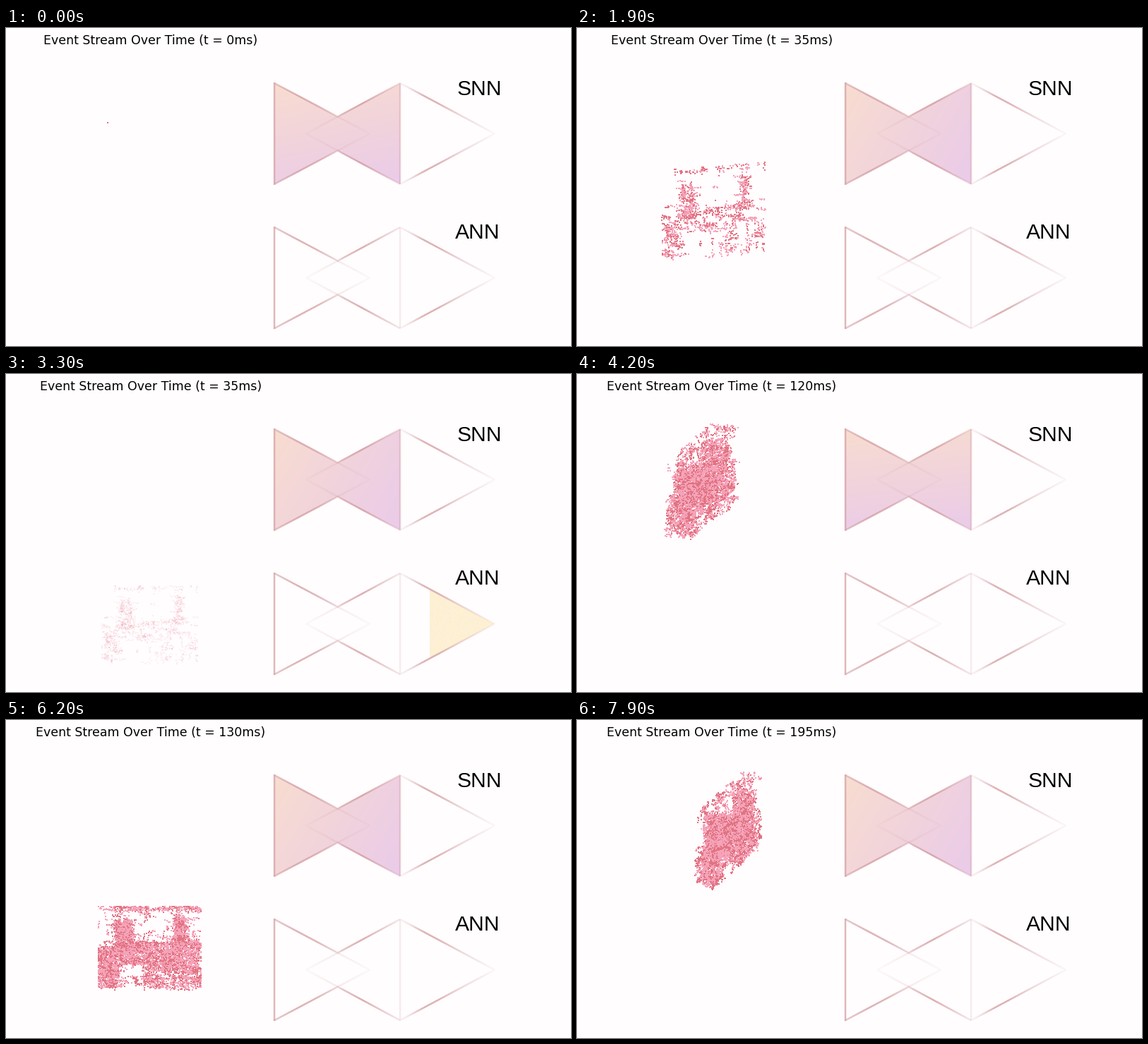
Write a matplotlib script that moves like this. It is 800 by 450 pixels and loops after 8 s.

```python
import numpy as np
import matplotlib.pyplot as plt
from matplotlib.animation import FuncAnimation
from matplotlib.collections import LineCollection
from matplotlib.colors import to_rgb
from matplotlib.patches import Polygon

W, H, DPI = 800, 450, 100
STEP, LOOP, PERIOD = 100, 8000, 4000
BG = "#fffdfe"
PX = 72 / DPI  # points per pixel

fig = plt.figure(figsize=(W / DPI, H / DPI), dpi=DPI, facecolor=BG)
ax = fig.add_axes([0, 0, 1, 1])
ax.set_axis_off()

LEFT, MID, RIGHT = 380, 558, 692
TALL = 143
EDGE = "#d0989c"


def rgb(*names):
    return np.array([to_rgb(n) for n in names])


WARM = rgb("#f8ddd0", "#f1d3dc", "#eacbea")
PINK = rgb("#f9dfe3", "#f9dbe2", "#f8dce4")
YELLOW = rgb("#fff3cd", "#fcefdc", "#f9e6e2")


def shade(s, stops):
    s = np.clip(s, 0, 1)
    x = np.linspace(0, 1, len(stops))
    return np.stack([np.interp(s, x, stops[:, i]) for i in range(3)], -1)


def smooth(p):
    p = np.clip(p, 0, 1)
    return p * p * (3 - 2 * p)


def edge(p, q, stops):
    """Line whose opacity varies along its length."""
    pos, alpha = zip(*stops)
    k = np.linspace(0, 1, 41)
    pts = np.array(p) + k[:, None] * (np.array(q) - np.array(p))
    colors = np.ones((40, 4))
    colors[:, :3] = to_rgb(EDGE)
    colors[:, 3] = np.interp((k[1:] + k[:-1]) / 2, pos, alpha)
    ax.add_collection(LineCollection(np.stack([pts[:-1], pts[1:]], 1), colors=colors,
                                     linewidths=2.5 * PX, capstyle="butt", zorder=3))


class Net:
    """Bow-tie encoder followed by one output triangle."""

    def __init__(self, top, mid_alpha):
        bot, cy = top + TALL, top + TALL / 2
        self.tie = self.area(LEFT, MID, top, [
            (LEFT, top), (469, top + 47), (MID, top),
            (MID, bot), (469, bot - 47), (LEFT, bot)])
        self.out = self.area(MID, RIGHT + 1, top, [(MID, top), (RIGHT, cy), (MID, bot)])
        rightward = [(0, .5), (.25, .75), (.45, .7), (.64, .4), (.68, .17), (1, .04)]
        leftward = [(0, .2), (.2, .5), (.4, .8), (.62, .55), (.68, .17), (1, .04)]
        outward = [(0, .08), (.1, .25), (.25, .75), (.4, .75), (.65, .35), (1, .05)]
        for y in (top, bot):
            edge((LEFT, y), (515, cy), rightward)
            edge((MID, y), (425, cy), leftward)
            edge((MID, y), (RIGHT, cy), outward)
        edge((LEFT, top - 1), (LEFT, bot + 1), [(0, .68), (1, .68)])
        edge((MID, top), (MID, bot), [(0, mid_alpha), (1, mid_alpha)])

    @staticmethod
    def area(x0, x1, top, corners):
        img = ax.imshow(np.zeros((TALL, x1 - x0, 4)), extent=(x0, x1, top + TALL, top),
                        interpolation="nearest", zorder=1)
        clip = Polygon(corners, closed=True, transform=ax.transData)
        img.set_clip_path(clip)
        gx, gy = np.meshgrid(np.arange(x0, x1) + .5, np.arange(TALL) + .5)
        return img, gx, gy

    @staticmethod
    def paint(part, color, lead=9999, trail=0):
        img, gx, _ = part
        mask = (gx < lead) & (gx >= trail)
        img.set_data(np.dstack([color, mask.astype(float)]))


snn = Net(78, .4)
ann = Net(282, .17)

ax.text(670.5, 95, "SNN", family="Liberation Sans", size=30 * PX, ha="center", color="black")
ax.text(668, 297.5, "ANN", family="Liberation Sans", size=30 * PX, ha="center", color="black")
title = ax.text(205, 23, "", family="DejaVu Sans", size=12.5, ha="center", color="black")
ax.set_xlim(0, W)
ax.set_ylim(H, 0)
ax.set_aspect("auto")

mottle = np.random.default_rng(4).random((TALL, RIGHT + 1 - MID))

SCENE = np.array([
    (.17, .32, .17, .55, 3), (0, .18, .5, .97, 3), (.2, .83, .43, .7, 5.2),
    (.75, .84, .13, .5, 2), (.84, 1, .4, .8, 1.2), (.1, 1, 0, .05, .8),
    (.45, 1, .7, .97, 2), (0, 1, 0, 1, 1.8)])


def record(seed, strokes, t0, t1):
    """Events (u, v, t) made of short strokes, and their polarity."""
    rng = np.random.default_rng(seed)
    box = SCENE[rng.choice(len(SCENE), strokes, p=SCENE[:, 4] / SCENE[:, 4].sum())]
    u = rng.uniform(box[:, 0], box[:, 1])
    v = rng.uniform(box[:, 2], box[:, 3])
    t = rng.uniform(t0 + 1, t1, strokes)
    ang = rng.choice([0, .35, np.pi / 2], strokes, p=[.45, .2, .35])
    run = np.linspace(-.5, .5, 5) * rng.uniform(.02, .1, strokes)[:, None]
    u = u[:, None] + run * np.cos(ang)[:, None] + rng.normal(0, .006, (strokes, 5))
    v = v[:, None] + run * np.sin(ang)[:, None] + rng.normal(0, .006, (strokes, 5))
    t = np.clip(t[:, None] + rng.normal(0, 2, (strokes, 5)), t0 + 1, t1)
    dark = (rng.random(strokes) < .38)[:, None] ^ (rng.random((strokes, 5)) < .08)
    uvt = np.stack([np.clip(u, 0, 1), np.clip(v, 0, 1), t], -1).reshape(-1, 3)
    return uvt, dark.ravel()


# count start (ms), first t, last t, events
RUNS = [(start, a, b, record(i + 1, n, a, b)) for i, (start, a, b, n) in enumerate(
    [(0, 0, 35, 360), (3450, 35, 130, 1700), (7330, 130, 195, 1700)])]
first = np.array([[.53, .38, 0]])
RUNS[0] = (0, 0, 35, (np.vstack([first, RUNS[0][3][0]]), np.append(True, RUNS[0][3][1])))

cloud = ax.scatter([], [], s=(2 * PX) ** 2, marker="s", linewidths=0, zorder=2)
DOTS = rgb("#f5a3b9", "#e17382")


def place(uvt, p):
    """Slanted space-time view (p = 0) turning into the flat view (p = 1)."""
    u, v, t = uvt.T
    slant = np.stack([108 + .45 * t + 68 * u, 122 + .05 * t + 110 * v - 56 * u], 1)
    zoom = 1 + .5 * (1 - p)
    cy = 130 + 225 * p
    flat = np.stack([203.5 + 135 * zoom * (u - .5), cy + 110 * zoom * (v - .5)], 1)
    slant[:, 1] += 205 * p
    r = smooth(p / .8)
    return slant * (1 - r) + flat * r


def draw_cloud(ms):
    k = max(i for i, run in enumerate(RUNS) if ms >= run[0])
    start, a, b, (uvt, dark) = RUNS[k]
    now = int(min(b, a + 5 * np.floor((ms - start) * .118 / 5)))
    title.set_text(f"Event Stream Over Time (t = {now}ms)")
    tau = ms - PERIOD * k
    seen = uvt[:, 2] <= now
    fade = np.clip(1 - (tau - 2450) / 950, 0, 1)
    cloud.set_offsets(place(uvt[seen], np.clip((tau - 1300) / 1050, 0, 1)))
    colors = np.ones((seen.sum(), 4))
    colors[:, :3] = DOTS[dark[seen].astype(int)]
    colors[:, 3] = fade
    cloud.set_facecolors(colors)


def draw_snn(ms):
    m = ms % PERIOD
    turn = 78 + .222 * m if ms < PERIOD else 30 + .27 * m
    a = np.radians(min(turn, 390))
    c, s = np.cos(a), np.sin(a)
    _, gx, gy = snn.tie
    span = abs(c) * (MID - LEFT) + abs(s) * TALL
    pos = ((gx - 469) * c + (gy - TALL / 2) * s) / span + .5
    snn.paint(snn.tie, shade(pos, WARM))
    _, gx, gy = snn.out
    pos = .5 + .25 * (gy - TALL / 2) * s / TALL
    snn.paint(snn.out, shade(pos, WARM), MID + (m - 450) * .4, MID + (m - 850) * .313)


def draw_ann(ms):
    m = ms % PERIOD
    lead = LEFT + (m - 2400) * .535
    trail = LEFT + (m - 2770) * .415
    _, gx, _ = ann.tie
    ann.paint(ann.tie, shade((gx - LEFT) / (MID - LEFT), PINK), lead, trail)
    ann.paint(ann.out, shade(mottle ** 2 * .8, YELLOW), lead, trail)


def update(i):
    ms = i * STEP
    draw_cloud(ms)
    draw_snn(ms)
    draw_ann(ms)
    return ()


anim = FuncAnimation(fig, update, frames=LOOP // STEP, interval=STEP,
                     init_func=lambda: update(0), repeat=True, repeat_delay=0)
plt.show()
```
